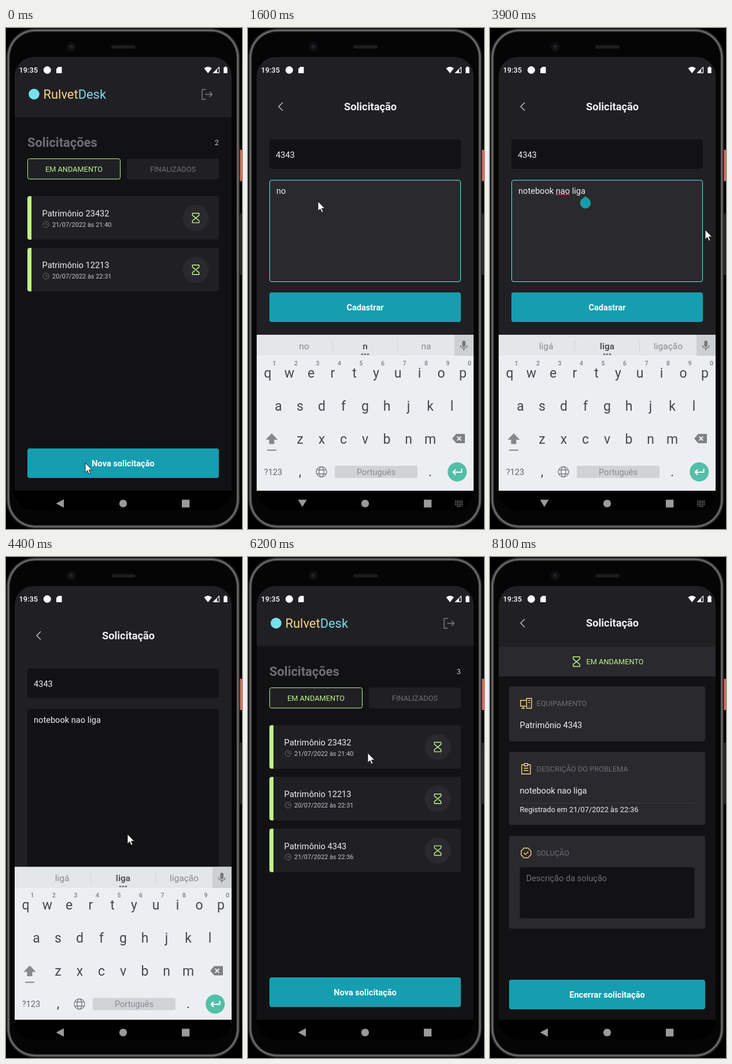
Recreate the animation shown at these times as an HTML page. Size 408x864 px, loop 8400 ms.

```html
<!DOCTYPE html>
<html lang="pt-BR">
<head>
<meta charset="utf-8">
<title>Solicitações</title>
<style>
  html, body { margin: 0; width: 100%; height: 100%; overflow: hidden; background: #000; }
  svg { display: block; width: 408px; height: 864px; font-family: Roboto, sans-serif; }
  text { white-space: pre; }
</style>
</head>
<body>
<svg id="stage" viewBox="0 0 408 864"></svg>
<script>
const C = {
  bg: '#121214', panel: '#202024', raised: '#29292e', dim: '#6e6e74', soft: '#c4c4cc', text: '#f0f0f4',
  teal: '#169db0', cyan: '#76e0ec', green: '#bff589', gold: '#fbd57c', key: '#44484c', nav: '#9a9a9a'
};
const XS = 10.95, SM = 12.77, MD = 14.6, LG = 18.25, XL = 21.9;

// Markup helpers
const rect = (x, y, w, h, fill, r = 0, more = '') =>
  `<rect x="${x}" y="${y}" width="${w}" height="${h}" rx="${r}" fill="${fill}" ${more}/>`;
const text = (x, y, s, size, fill, more = '') =>
  `<text x="${x}" y="${y}" font-size="${size}" fill="${fill}" ${more}>${s}</text>`;
const disc = (x, y, r, fill, more = '') => `<circle cx="${x}" cy="${y}" r="${r}" fill="${fill}" ${more}/>`;
const line = (d, color, w = 1.3, more = '') =>
  `<path d="${d}" fill="none" stroke="${color}" stroke-width="${w}" stroke-linejoin="round" ${more}/>`;
const shape = (d, fill, more = '') => `<path d="${d}" fill="${fill}" ${more}/>`;
const at = (x, y, s) => `<g transform="translate(${x} ${y})">${s}</g>`;
const group = (id, s, more = '') => `<g id="${id}" ${more}>${s}</g>`;
const MID = 'text-anchor="middle"', BOLD = 'font-weight="700"', MEDIUM = 'font-weight="500"';

const hourglass = (x, y) => at(x, y, line(
  'M-5.7-8.2H5.7V-4.6L-5.7 4.6V8.2H5.7V4.6L-5.7-4.6Z', C.green, 1.4));
const button = (x, y, w, label) =>
  rect(x, y, w, 51, C.teal, 4) + text(202.5, y + 30.8, label, MD, '#fff', `${MID} ${BOLD}`);
const title = y =>
  line(`M60 ${y - 7}l-7 7 7 7`, C.soft, 1.4) +
  text(211.5, y + 6.3, 'Solicitação', LG, C.text, `${MID} ${BOLD}`);

// Pages
const card = (i, number, date) => at(37, 290 + i * 89.3,
  rect(0, 0, 331, 75, C.panel, 4) +
  shape('M4 0h3v75h-3a4 4 0 0 1-4-4v-67a4 4 0 0 1 4-4z', C.green) +
  text(25.5, 35, 'Patrimônio ' + number, MD, C.text) +
  disc(32.3, 48.7, 5, 'none', `stroke="${C.dim}"`) + line('M32.3 46v2.7h2.8', C.dim, 1) +
  text(43, 52.6, date, XS, C.soft) +
  disc(291, 37.7, 22.4, C.raised) + hourglass(291, 37.7));

const home = rect(15, 50, 375, 748, C.bg) + rect(15, 50, 375, 103.5, C.panel) +
  disc(48.5, 114, 9.3, C.cyan) +
  text(64.5, 121.5, `Rulvet<tspan fill="${C.cyan}">Desk</tspan>`, XL, C.gold) +
  line('M345.5 106h-6.5v17h6.5M344.5 114.5h12M352 110.2l4.4 4.3-4.4 4.3', '#7c7c84', 1.4) +
  text(37, 204.5, 'Solicitações', XL, C.dim, BOLD) +
  text(368, 202, '', SM, C.soft, 'id="count" text-anchor="end"') +
  rect(37.5, 225.5, 160, 35, C.panel, 3, `stroke="${C.green}"`) +
  text(117.5, 247.8, 'EM ANDAMENTO', SM, C.green, MID) +
  rect(209, 225, 159, 36, C.panel, 3) + text(288.5, 247.8, 'FINALIZADOS', SM, C.dim, MID) +
  card(0, 23432, '21/07/2022 às 21:40') + card(1, 12213, '20/07/2022 às 22:31') +
  group('added', card(2, 4343, '21/07/2022 às 22:36')) +
  button(37, 725, 331, 'Nova solicitação');

const form = rect(15, 50, 375, 748, C.panel) + title(135.5) +
  rect(37.5, 192.5, 330, 50, C.bg, 3.5, 'id="numBox"') + text(48, 223.5, '', MD, C.text, 'id="num"') +
  rect(37.5, 262.5, 330, 175, C.bg, 3.5, 'id="descBox"') + text(48, 285.5, '', MD, C.text, 'id="desc"') +
  line('M113.5 287.3H138', '#c8434a', 1.4, 'id="typo"') +
  group('handle', shape('M165 290.5l6.3 5a9 9 0 1 1-12.6 0z', C.teal, 'stroke="#2f8f5c"')) +
  group('save', button(37, 456, 331, 'Cadastrar'));

const section = (y, h, label, icon) => rect(33, y, 339, h, C.raised, 4) +
  text(80.5, y + 34.2, label, SM, C.dim) + at(62.3, y + 29.3, line(icon, C.gold, 1.4));
const badge = Array.from({ length: 8 }, (_, i) => {
  const a = i * Math.PI / 4, p = (r, b) => `${(r * Math.cos(b)).toFixed(1)} ${(r * Math.sin(b)).toFixed(1)}`;
  return `${i ? '' : 'M' + p(8, a)}Q${p(10.6, a + .39)} ${p(8, a + .785)}`;
}).join('') + 'M-3.8 0l2.8 2.8 5-5';
const detail = rect(15, 50, 375, 748, C.bg) + rect(15, 50, 375, 105, C.panel) + title(114) +
  rect(15, 155, 375, 51, C.raised) + hourglass(149.5, 180.5) + text(166.5, 185, 'EM ANDAMENTO', SM, C.green) +
  section(223, 95, 'EQUIPAMENTO', 'M0 5h-9.5v-10h9.5M-5 5v3.5M-8 8.5h6M1-8.5h8.5v17h-8.5zM4-5h3M4-1.5h3M5.2 5h.8') +
  text(51.5, 295, 'Patrimônio 4343', MD, C.text) +
  section(336, 126, 'DESCRIÇÃO DO PROBLEMA', 'M-3-7h-4.5v16h15v-16h-4.5M-3-9h6v4h-6zM-4-1h8M-4 3h8') +
  text(51.5, 408.3, 'notebook nao liga', MD, C.text) + rect(51.5, 424, 302, 1, '#3a3a40') +
  text(51.5, 439.6, 'Registrado em 21/07/2022 às 22:36', SM, C.text) +
  section(481, 160, 'SOLUÇÃO', badge) + rect(51.5, 535, 302, 88, C.bg, 4) +
  text(62.5, 558.5, 'Descrição da solução', MD, C.dim) + button(33, 729, 339, 'Encerrar solicitação');

// Keyboard
const keys = (s, x, y) => [...s].map((c, i) => text(x + i * 37.5, y, c, 23, C.key, MID)).join('');
const digits = [...'1234567890'].map((c, i) => text(45.5 + i * 37.5, 582, c, 10.5, '#777b80', `${MID} ${MEDIUM}`)).join('');
const word = (id, x, more) => text(x, 554, '', 15.5, '#85898d', `id="${id}" ${MID} ${more}`);
const keyboard = rect(15, 529, 375, 269, '#eceef2') + rect(15, 529, 375, 36.5, '#e4e7e9') +
  rect(357, 529, 33, 36.5, '#cdd0d2') + rect(146, 539, 1, 20, '#d2d5d7') + rect(258, 539, 1, 20, '#d2d5d7') +
  rect(15, 565.5, 375, 1, '#f4f5f7') +
  rect(370.4, 539, 5.6, 11, '#73777a', 2.8) + line('M367.5 547c0 7 11.5 7 11.5 0M373.2 552v4', '#73777a', 1.6) +
  word('left', 97, '') + word('middle', 202.5, 'font-weight="700" style="fill:#55595d"') + word('right', 308, '') +
  group('dots', [197.5, 202.5, 207.5].map(x => rect(x - 1.7, 561.5, 3.4, 2.4, '#666a6e')).join('')) +
  digits + keys('qwertyuiop', 34, 602.5) + keys('asdfghjkl', 52.5, 659.5) + keys('zxcvbnm', 90, 717) +
  shape('M41 699l10.5 11h-6v7.5h-9v-7.5h-6z', '#85898c') + rect(33, 727, 16, 2, '#85898c') +
  shape('M360 700h15v16h-15l-7-8z', '#7d8184') + line('M361.5 704.5l7 7m0-7l-7 7', '#eceef2', 1.8) +
  text(43.5, 770.5, '?123', MD, '#62666a', MID) + text(90, 773, ',', 23, C.key, MID) + text(315, 773, '.', 23, C.key, MID) +
  at(127, 765.5, line('M-9 0a9 9 0 1 0 18 0a9 9 0 1 0-18 0M-4 0a4 9 0 1 0 8 0a4 9 0 1 0-8 0M-8-3.5h16M-8 3.5h16', '#777b7f', 1.3)) +
  rect(150, 755, 143, 21, '#d0d3d6', 2) + text(221.5, 770.5, 'Português', MD, '#888c90', MID) +
  disc(361.7, 765.5, 16.5, '#52bfa8') +
  line('M354 766l5 5 10.5-11', '#fff', 2, 'id="check"') +
  line('M369.5 760v6h-15M359 761.5l-4.5 4.5 4.5 4.5', '#fff', 2, 'id="enter"');

const navIcons =
  shape('M86.5 820l13.5-7.3v14.6z', 'inherit', 'id="back" style="fill:inherit"') +
  shape('M86.5 813.5h15l-7.5 12.5z', 'inherit', 'id="down" style="fill:inherit"') +
  '<circle cx="202.5" cy="820" r="6.6"/><rect x="304" y="813.5" width="13.3" height="13.3"/>' +
  group('kbIcon', line('M358 816h13.5M358 819h13.5M358 822h13.5M361 825h7.5', C.nav, 1.6, 'stroke-dasharray="1.7 1.2"'));

const alertBox = rect(15, 50, 375, 748, '#000', 0, 'opacity=".62"') + rect(39, 372, 327, 148.5, '#fff', 2) +
  text(61, 408, 'Solicitação', LG, '#000', MEDIUM) +
  text(61, 436.3, 'Solicitação registrada com sucesso.', MD, '#242424') + text(317, 497, 'OK', SM, '#000', BOLD);

// Metal rim as nested rounded plates, from the edge inwards
const rim = [[0, '#1e1e1e'], [1.5, '#4a4a4a'], [3.2, '#7c7c7c'], [4.6, '#383838'], [6.2, '#050505']];
const phone = rect(403, 210, 5, 54, '#e2675a', 1) + rect(403, 320, 4.5, 106, '#2c2c2c', 1) +
  rim.map(([d, color]) => rect(.5 + d, .5 + d, 404 - 2 * d, 863 - 2 * d, color, 50 - d)).join('') +
  disc(113, 32.5, 8.5, '#0e0e10') + disc(113, 32.5, 4, '#1b1c22') + disc(111.5, 31.5, 1.3, '#34363d') +
  rect(182, 29.5, 42, 6, '#1d1d1e', 3);

const status = text(22.5, 77, '19:35', SM, '#fff', MEDIUM) + disc(71.3, 72.5, 6.5, '#fff') +
  shape('M90.5 67h6v11h-9.5v-7.5z', '#fff') +
  shape('M342.5 69.5q6.7-5.5 13.4 0l-6.7 8.5z', '#fff') +
  line('M358.5 77.3h10v-10z', '#fff', 1.2) + shape('M358 77.8l7-7v7z', '#fff') +
  shape('M376.3 68h1.7v-1.5h3v1.5h1.7v10h-6.4z', '#fff');

document.getElementById('stage').innerHTML =
  '<defs><clipPath id="screen"><rect x="15" y="50" width="375" height="782" rx="33"/></clipPath></defs>' + phone +
  '<g clip-path="url(#screen)">' +
  group('home', home) + group('form', form) + group('detail', detail) + group('alert', alertBox) +
  rect(15, 798, 375, 34, '#000') + rect(15, 529, 375, 303, '#fcfdfd', 0, 'id="tray"') +
  group('keyboard', keyboard) + rect(15, 798, 375, 34, '#000', 0, 'id="navBar"') +
  status + group('nav', navIcons) + '</g>' +
  group('cursor', shape('M0 0v16.6l3.8-3.6 2.6 6 2.6-1.1-2.6-5.8h5.4z', '#fff', 'stroke="#111" stroke-width=".9"'));

// Timeline
const $ = Object.fromEntries([...document.querySelectorAll('[id]')].map(e => [e.id, e]));
const LOOP = 8400, STEP = 100, WIDTH = 375, KB = 269;
const NUMBER = '4343', PROBLEM = 'notebook nao liga';
const path = [
  [0, 137, 750], [100, 137, 750], [600, 94, 225], [1000, 94, 225], [1400, 121, 299], [3400, 121, 299],
  [3900, 372, 348], [4200, 210, 478], [4700, 210, 478], [5100, 177, 533], [5400, 322, 488],
  [5700, 322, 488], [6200, 207, 338], [6400, 223, 501], [LOOP, 223, 501]
];
const hints = {
  n: 'no na', no: 'nos não', not: 'nota note', note: 'noite notebook', na: 'nas não', nao: 'não nato',
  l: 'lá li', li: 'lá lhe', lig: 'liga ligue', liga: 'ligá ligação'
};
const clamp = v => Math.max(0, Math.min(1, v));
const smooth = p => (1 - Math.cos(Math.PI * p)) / 2;
const slide = (t, start) => smooth(clamp((t - start) / 400));
const show = (el, on) => { el.style.display = on ? '' : 'none'; };
const move = (el, x, y = 0) => el.setAttribute('transform', `translate(${x} ${y})`);
const set = (el, attrs) => { for (const k in attrs) el.setAttribute(k, attrs[k]); };

function pointer(t) {
  const i = path.findIndex(p => p[0] > t), [t0, x0, y0] = path[i - 1], [t1, x1, y1] = path[i];
  const e = smooth((t - t0) / (t1 - t0));
  return [x0 + (x1 - x0) * e, y0 + (y1 - y0) * e];
}
const typed = t => Math.max(0, t < 2500 ? Math.min(9, (t - 1400) / STEP) : Math.min(17, 9 + (t - 2500) / STEP));

function field(name, value, hint, focused) {
  set($[name + 'Box'], { fill: focused ? C.raised : C.bg, stroke: focused ? C.cyan : C.bg });
  set($[name], { x: focused ? 49 : 48, fill: value ? C.text : C.dim });
  $[name].textContent = value || hint;
}

function render(t) {
  const push = slide(t, 0), pop = slide(t, 4800), open = slide(t, 6800);
  move($.home, WIDTH * (t < 4800 ? push : t < 6800 ? 1 - pop : open));
  move($.form, -WIDTH * (t < 4800 ? 1 - push : pop));
  move($.detail, -WIDTH * (1 - open));
  const saved = t >= 4400;
  $.count.textContent = saved ? 3 : 2;
  show($.added, saved);

  // The form shrinks while the keyboard is up
  const typing = t > 600 && !saved, inDesc = t >= 1400, n = typed(t);
  field('num', NUMBER.slice(0, Math.max(0, (t - 600) / STEP)), 'Número do patrimônio', typing && !inDesc);
  field('desc', PROBLEM.slice(0, n), 'Descrição do problema', typing && inDesc);
  set($.descBox, { height: typing ? 175 : 175 + KB });
  move($.save, 0, typing ? 0 : KB);
  set($.save, { opacity: saved ? .5 : 1 });
  show($.typo, n > 12 && !saved);
  show($.handle, t >= 3500 && !saved);

  const drop = saved ? KB * clamp((t - 4350) / 350) ** 2 : KB * (1 - clamp((t - 600) / 310)) ** 2;
  const rising = typing && drop > 1;
  show($.keyboard, t > 600 && t < 4700);
  move($.keyboard, 0, drop);
  show($.tray, rising);
  show($.navBar, !rising);
  set($.nav, { fill: rising ? '#fbfbfc' : C.nav });
  show($.back, !typing || rising);
  show($.down, typing && !rising);
  show($.kbIcon, typing && !rising);
  show($.check, !inDesc);
  show($.enter, inDesc);
  const current = PROBLEM.slice(0, typed(t - STEP)).split(' ').pop();
  const sides = current ? (hints[current] || 'note notebook').split(' ') : ['', ''];
  $.left.textContent = sides[0];
  $.middle.textContent = current;
  $.right.textContent = sides[1];
  show($.dots, current);

  $.alert.style.opacity = clamp((t - 4750) / 150) * (1 - clamp((t - 5700) / 150));
  move($.cursor, ...pointer(t));
  show($.cursor, t < 7800);
}

const start = performance.now();
function tick() {
  const t = (performance.now() - start) % LOOP;
  render(Math.floor(t / STEP) * STEP);
  requestAnimationFrame(tick);
}
tick();
</script>
</body>
</html>
```
